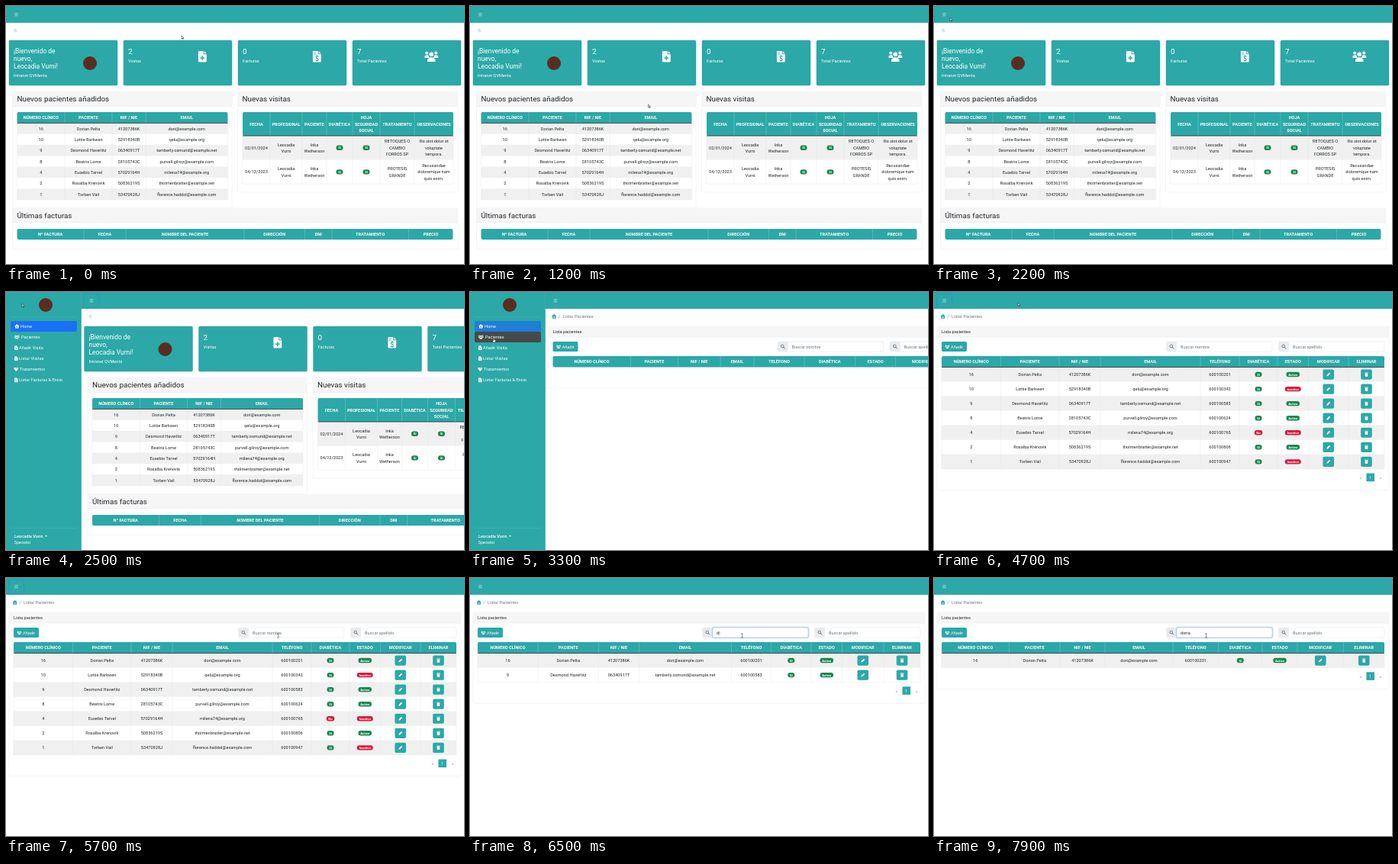
An HTML page for the animation above (8000 ms loop, 600 by 338 pixels).

```html
<!DOCTYPE html>
<html lang="es">
<head>
<meta charset="utf-8">
<title>Intranet</title>
<style>
html, body { margin: 0; width: 100%; height: 100%; overflow: hidden; background: #fff; }
svg { display: block; width: 100vw; height: 100vh; }
text { font: 5.62px Roboto, "Open Sans", sans-serif; fill: #212529; white-space: pre; }
.m { text-anchor: middle; }
.b { font-weight: 700; }
.s { font-weight: 500; }
.w { fill: #fff; }
.g { fill: #6c757d; }
.h4 { font-size: 8.43px; }
.h3 { font-size: 9.84px; }
.sm { font-size: 4.9px; }
.xs { font-size: 4.2px; }
</style>
</head>
<body>
<svg viewBox="0 0 600 338">
  <g id="main"></g>
  <g id="side"></g>
  <g id="pointer"></g>
</svg>
<script>
const TEAL = '#2ca8a8', BLUE = '#1a70f8', GREEN = '#198754', RED = '#d81b43', LOGO = '#5a2d20';
const LOOP = 8000, SIDE = 98.5;
const $ = id => document.getElementById(id);

// Drawing helpers
const text = (x, y, s, cls = '') => `<text x="${x}" y="${y}" class="${cls}">${s}</text>`;
const rect = (x, y, w, h, fill, more = '') =>
  `<rect x="${x}" y="${y}" width="${w}" height="${h}" fill="${fill}" ${more}/>`;
const path = (d, fill, more = '') => `<path d="${d}" fill="${fill}" ${more}/>`;
const line = (d, color, width = .35) => path(d, 'none', `stroke="${color}" stroke-width="${width}"`);
const at = (x, y, body, scale = 1) => `<g transform="translate(${x} ${y}) scale(${scale})">${body}</g>`;
const dot = (x, y, r, fill) => `<circle cx="${x}" cy="${y}" r="${r}" fill="${fill}"/>`;

// Icons, centred on 0,0
const house = (fill, hole) =>
  path('M0-3.2L3.4-.2H2.5V2.8H-2.5V-.2H-3.4Z', fill) + rect(-.8, .2, 1.6, 1.6, hole);
const file = path('M-4-7.2H1.4V-3H5.4V6Q5.4 7.2 4.2 7.2H-4.2Q-5.4 7.2-5.4 6V-6Q-5.4-7.2-4-7.2ZM2.4-7.2L5.4-4H2.4Z', '#fff');
const filePlus = file + line('M-2.8 2H2.8M0-.8V4.8', TEAL, 1.5);
const fileBill = file + line('M-3.8-5.2H-1M-3.8-3.2H-1', TEAL, .8) + text(0, 5.2, '$', 'm b h4').replace('<text', `<text style="fill:${TEAL}"`);
const people = dot(0, -3, 2.8, '#fff') + dot(-6, -4.8, 2, '#fff') + dot(6, -4.8, 2, '#fff') +
  path('M-5.4 6.6Q-5.4 1 0 1T5.4 6.6ZM-9 1.6Q-9-2-6-2-4-2-3.6-1.4-3.6.6-2.6 1.6ZM9 1.6Q9-2 6-2 4-2 3.6-1.4 3.6.6 2.6 1.6Z', '#fff');
const heart = path('M0 2.7L-2.6 0C-4-2.2-1.4-3.6 0-1.5 1.4-3.6 4-2.2 2.6 0Z', '#fff');
const lens = `<circle cx="-.5" cy="-.5" r="1.9" fill="none" stroke="#333" stroke-width=".55"/>` + line('M.9.9L2.8 2.8', '#333', .8);
const pencil = path('M-2.5 2.5L-2 .7 1.1-2.4 2.4-1.1-.7 2Z', '#fff');
const trash = path('M-2.2-2.5H2.2V-1.7H-2.2ZM-1.9-1.2H1.9L1.6 2.7H-1.6Z', '#fff');
const burger = line('M-2.3-1.7H2.3M-2.3 0H2.3M-2.3 1.7H2.3', '#c9e8e8', .6);

const badge = (s, fill, w) => rect(-w / 2, -3.2, w, 6.4, fill, 'rx="3"') + text(0, 1.5, s, 'm b w xs');
const button = icon => rect(-7.3, -6.6, 14.6, 13.2, TEAL, 'rx="1.8"') + icon;
const yes = badge('Sí', GREEN, 9);
const no = badge('No', RED, 10.5);

function cell(x, y, s, cls = '') {
  if (s[0] === '<') return at(x, y, s);
  const parts = s.split('\n');
  return parts.map((p, i) => text(x, y + 2 + (i - (parts.length - 1) / 2) * 8.43, p, 'm ' + cls)).join('');
}

// Table from column edges, with striped rows
function table(edges, top, headH, heads, rowH = 0, rows = []) {
  const x0 = edges[0], w = edges.at(-1) - x0, body = top + headH, end = body + rowH * rows.length;
  const mid = i => (edges[i] + edges[i + 1]) / 2;
  let out = rect(x0, top, w, headH, TEAL, 'rx="2"');
  rows.forEach((row, r) => {
    const y = body + r * rowH;
    out += rect(x0, y, w, rowH, r % 2 ? '#fff' : '#f0f0f0') + line(`M${x0} ${y + rowH}h${w}`, '#dee2e6');
    row.forEach((s, i) => out += cell(mid(i), y + rowH / 2, s));
  });
  edges.forEach((x, i) => {
    if (i && i < edges.length - 1) out += line(`M${x} ${top}V${body}`, '#8fd0d0', .4);
    if (rows.length) out += line(`M${x} ${body}V${end}`, '#e1e4e6');
  });
  if (rows.length) out += line(`M${x0} ${body}h${w}`, '#222', .8);
  heads.forEach((s, i) => out += cell(mid(i), top + headH / 2, s, 'b w'));
  return out;
}

const panel = (x, y, w, h, headH) =>
  rect(x, y, w, h, '#fff', 'stroke="#e4e4e6" stroke-width=".4" rx="1.5"') +
  rect(x, y, w, headH, '#f6f6f7', 'rx="1.5"') + line(`M${x} ${y + headH}h${w}`, '#dcdcde');

// Data: number, name, id, email, phone, diabetic, active
const patients = [
  ['16', 'Dorian Pelta', '41207386K', 'dori@example.com', '600100201', 1, 1],
  ['10', 'Lottie Barkwen', '52918340B', 'qelu@example.org', '600100342', 1, 0],
  ['9', 'Desmond Haverlitz', '06340917T', 'tamberly.osmund@example.net', '600100583', 1, 1],
  ['8', 'Beatrix Lome', '28105743C', 'purvell.gilroy@example.com', '600100624', 1, 1],
  ['4', 'Eusebio Tarvel', '57029164H', 'milena74@example.org', '600100765', 0, 0],
  ['2', 'Rosalba Krenovik', '50836219S', 'tholmenbratter@example.net', '600100806', 1, 1],
  ['1', 'Torben Vail', '53470928J', 'florence.haddol@example.com', '600100947', 1, 0]
];
const USER = 'Leocadia Vurni', PROFESSIONAL = 'Leocadia\nVurni', PATIENT = 'Inka\nWetherson';
const idHeads = ['NÚMERO CLÍNICO', 'PACIENTE', 'NIF / NIE', 'EMAIL'];
const listHeads = [...idHeads, 'TELÉFONO', 'DIABÉTICA', 'ESTADO', 'MODIFICAR', 'ELIMINAR'];
const listEdges = {
  0: [10, 112, 174, 229.5, 273.5, 339.5, 406, 459, 532, 590],
  1: [10, 98.5, 165, 224, 313, 372.5, 430, 476, 536.5, 590],
  2: [10, 89, 168.5, 221.5, 342.5, 394.5, 447, 487.5, 542, 590],
  7: [10, 87.5, 164, 218, 349, 400, 450, 490.5, 543, 590]
};

const topBar = ring => rect(0, 0, 602, 22, TEAL) + at(13.5, 11.2, burger) +
  (ring ? rect(3.5, 2, 20, 18.5, 'none', 'rx="2" stroke="#2e86c4" stroke-width="1" opacity=".45"') : '');

function homePage(ring) {
  const card = (x, n, label, icon) => rect(x, 45, 142, 59, TEAL, 'rx="1.6" stroke="#249696" stroke-width=".4"') +
    (label ? text(x + 6, 63, n, 'w h3') + text(x + 6, 74, label, 'w') + at(x + 103.3, 66.3, icon) : '');
  return topBar(ring) + at(12, 32, house('#d9dcde', '#fff'), .8) +
    card(4) +
    ['¡Bienvenido de', 'nuevo,', USER + '!'].map((s, i) =>
      text(10, 61.8 + i * 9.9, s.replace('Leocadia', 'Leocadia'), 'w h4')).join('') +
    text(10, 93, 'Intranet QVMenta', 'w') + dot(110, 75, 9, LOGO) +
    card(154, 2, 'Visitas', filePlus) + card(304, 0, 'Facturas', fileBill) +
    card(454, 7, 'Total Pacientes', people) +
    panel(8.5, 112, 287.5, 153, 19.5) + text(14.5, 124.8, 'Nuevos pacientes añadidos', 'h3') +
    table([14.5, 77, 139, 183, 290.5], 139, 14.4, idHeads, 14.35, patients.map(p => p.slice(0, 4))) +
    panel(303.5, 112, 288.5, 132, 19.5) + text(309.5, 124.8, 'Nuevas visitas', 'h3') +
    table([310, 346, 388, 420, 454, 490, 535, 586], 139, 31,
      ['FECHA', 'PROFESIONAL', 'PACIENTE', 'DIABÉTICA', 'HOJA\nSEGURIDAD\nSOCIAL', 'TRATAMIENTO', 'OBSERVACIONES'], 31.6, [
        ['02/01/2024', PROFESSIONAL, PATIENT, yes, yes, 'RETOQUES O\nCAMBIO\nFORROS SP', 'Illo sint dolor et\nvoluptate\ntempora.'],
        ['04/12/2023', PROFESSIONAL, PATIENT, yes, yes, 'PROTESIS\nGRANDE', 'Recusandae\ndoloremque nam\nquis enim.']
      ]) +
    panel(8.5, 265, 583.5, 53, 18.5) + text(14.5, 277.8, 'Últimas facturas', 'h3') +
    table([14.5, 102, 157, 312, 391.5, 427, 527.5, 585.5], 292, 14,
      ['Nº FACTURA', 'FECHA', 'NOMBRE DEL PACIENTE', 'DIRECCIÓN', 'DNI', 'TRATAMIENTO', 'PRECIO']);
}

function listPage({ ring, loaded, typed, focus, caret }) {
  const found = loaded ? patients.filter(p => p[1].toLowerCase().startsWith(typed)) : [];
  const rows = found.map(p => [...p.slice(0, 5), p[5] ? yes : no,
    p[6] ? badge('Activo', GREEN, 17.5) : badge('Inactivo', RED, 21), button(pencil), button(trash)]);
  const end = 98.5 + rows.length * 19.05;
  const field = (x, hint) => rect(x, 65, 138.5, 13, '#fff', 'rx="2" stroke="#d6dade" stroke-width=".4"') +
    rect(x, 65, 13.5, 13, '#e9ecef', 'rx="2"') + at(x + 6.8, 71.5, lens) + text(x + 18.5, 73.5, hint, 'g');
  let out = topBar(ring) + at(11.7, 32, house(TEAL, '#fff'), .95) + text(17.5, 34, '/', 'g') +
    text(23, 34, 'Listar Pacientes', 'g') +
    panel(4, 45, 592, end - 17.5, 14) + text(10, 54, 'Lista pacientes') +
    rect(10, 65, 33, 13, TEAL, 'rx="1.8"') + at(17.5, 71.8, people, .33) + text(22, 73.5, 'Añadir', 'w') +
    field(304.5, focus ? '' : 'Buscar nombre') + field(451.5, 'Buscar apellido');
  if (focus) out += rect(317.6, 64.6, 125.8, 13.8, '#fff', 'rx="2.2" stroke="#c2dbfe" stroke-width="1.9"') +
    rect(318, 65, 125, 13, '#fff', 'rx="2" stroke="#86b7fe" stroke-width=".5"') +
    text(323, 73.5, typed + (caret ? '|' : ''));
  out += table(listEdges[rows.length], 84, 14.5, listHeads, 19.05, rows);
  if (rows.length) out += text(559, end + 13, '‹‹', 'm g sm') + rect(566.5, end + 5.7, 10.5, 10.6, TEAL) +
    text(571.7, end + 13, '1', 'm w') + text(585, end + 13, '››', 'm g sm');
  return out;
}

function sidebar(homeFill, patientFill) {
  const items = [
    [house('#fff', BLUE), 19, 'Home', .9], [people, 20, 'Pacientes', .38], [filePlus, 17, 'Añadir Visita', .4],
    [fileBill, 17, 'Listar Visitas', .4], [heart, 18, 'Tratamientos', 1], [fileBill, 17, 'Listar Facturas &amp; Envío', .4]
  ];
  return rect(0, 0, SIDE, 338, TEAL) + line(`M${SIDE} 0V338`, '#249090', .5) + dot(52, 17, 9, LOGO) +
    line('M6 32.8H93M6 309.5H93', '#5cbcbc', .4) +
    rect(6, 38, 87, 14, homeFill, 'rx="2"') + rect(6, 52, 87, 14, patientFill, 'rx="2"') +
    items.map(([icon, x, s, k], i) => at(i > 1 ? 13.3 : 14.3, 45 + i * 14.05, icon, k) +
      text(x, 47 + i * 14.05, s, 'w')).join('') +
    text(11, 321.6, USER, 'w s') + path('M51 318.9h3.2l-1.6 1.8Z', '#fff') + text(11, 330, 'Specialist', 'w sm');
}

// Pointer shapes, hot spot on 0,0
const outline = 'stroke="#222" stroke-width=".55"';
const shapes = {
  arrow: path('M0 0V4L1 3.1 1.7 4.6 2.4 4.3 1.7 2.9H3Z', '#fff', outline),
  hand: path('M-.6 0Q0-.8.6 0V1.9L2.4 2.4V4.2L1.7 5.4H-.6L-2 3.2-.6 3.4Z', '#fff', outline),
  beam: line('M-1.2-2.6H1.2M0-2.6V2.6M-1.2 2.6H1.2', '#333', .55)
};
const route = [
  [0, 230, 39], [300, 230, 42], [1100, 233.5, 129], [1300, 233.5, 129], [1800, 35, 27], [2200, 21, 15.5], [2500, 21, 15.5],
  [2950, 31, 60.5], [3500, 31, 60.5], [4250, 112, 12], [4450, 112, 12], [4700, 110, 14], [4900, 110, 14], [5700, 356.5, 75.5]
];
const clamp = v => Math.min(1, Math.max(0, v));
const smooth = v => v * v * (3 - 2 * v);

function pointerAt(t) {
  const i = route.findLastIndex(k => k[0] <= t), [t0, x0, y0] = route[i];
  const [t1, x1, y1] = route[i + 1] || [LOOP, x0, y0];
  const k = smooth((t - t0) / (t1 - t0));
  return [x0 + (x1 - x0) * k, y0 + (y1 - y0) * k];
}

const word = 'doria', keyTimes = [6500, 6600, 6700, 6800, 7000];
const cache = {};
function show(id, html) {
  if (cache[id] !== html) $(id).innerHTML = cache[id] = html;
}

function draw(now) {
  const t = now % LOOP;
  const [px, py] = pointerAt(t);
  const open = smooth(clamp((t - 2330) / 150)) - smooth(clamp((t - 4400) / 150));
  const onList = t >= 3200, focus = t >= 5800;
  const ring = t >= 2400 && t < 3200 || t >= 4400 && t < 5800;
  const count = keyTimes.filter(k => k <= t).length;
  const lastEdit = count ? keyTimes[count - 1] : 5800;
  const hover = open > .5 && px > 6 && px < 93 && py > 52 && py < 66;

  show('main', onList
    ? listPage({ ring, focus, loaded: t >= 3500, typed: word.slice(0, count), caret: (t - lastEdit) % 1000 < 500 })
    : homePage(ring));
  show('side', sidebar(!onList ? BLUE : t < 3400 ? '#207dd8' : TEAL, hover ? '#464a4b' : onList ? BLUE : TEAL));
  const overField = onList && px > 318 && px < 443 && py > 65 && py < 78;
  show('pointer', shapes[overField ? 'beam' : hover ? 'hand' : 'arrow']);

  $('main').setAttribute('transform', `translate(${SIDE * open} 0)`);
  $('side').setAttribute('transform', `translate(${SIDE * (open - 1) - (open ? 0 : 2)} 0)`);
  $('pointer').setAttribute('transform', `translate(${px} ${py})`);
  requestAnimationFrame(draw);
}
requestAnimationFrame(draw);
</script>
</body>
</html>
```
